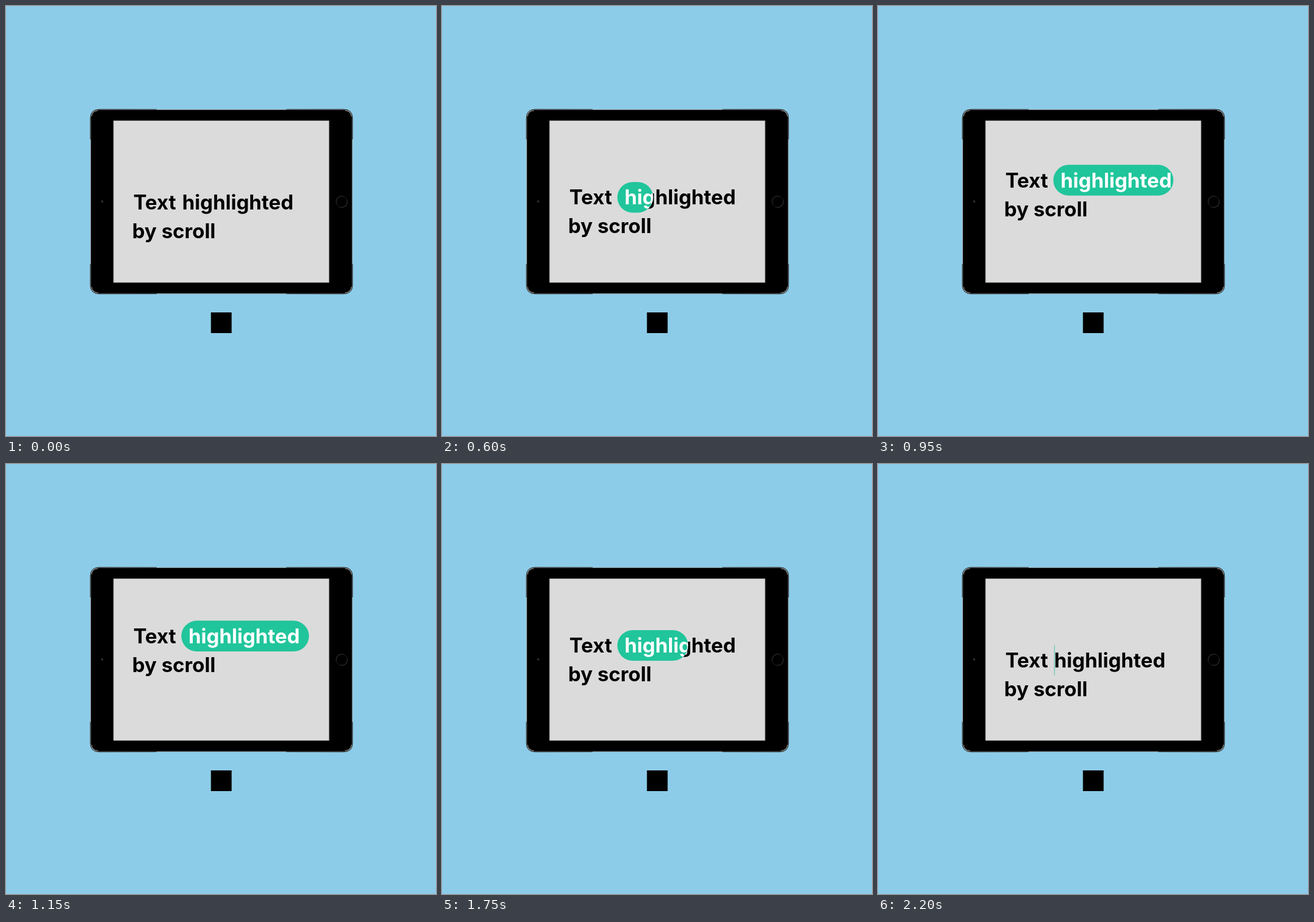
Recreate the animation shown at these times as an HTML page. Size 748 by 748 pixels, loop 2250 ms.

```html
<!DOCTYPE html>
<html lang="en">
<head>
<meta charset="utf-8">
<title>Text highlighted by scroll</title>
<style>
html, body { margin: 0; width: 100%; height: 100%; overflow: hidden; background: #8dcce8; }
svg { display: block; width: 100vw; height: 100vh; }
text { font: 700 35px Inter, "Liberation Sans", sans-serif; font-optical-sizing: none; }
</style>
</head>
<body>
<svg viewBox="0 0 748 748">
  <defs>
    <linearGradient id="ring" x1="0" x2="1" y1="0" y2="1">
      <stop offset="0" stop-color="#5a5a5a"/>
      <stop offset=".5" stop-color="#161616"/>
      <stop offset="1" stop-color="#5a5a5a"/>
    </linearGradient>
    <clipPath id="clip"><rect class="pill" y="314.6" height="53.4"/></clipPath>
    <g id="corner" fill="none">
      <path d="M146.8 232V195Q146.8 180 162 179.8L262 180" stroke="#1c1c1c"/>
      <path d="M149 192Q149.5 182.5 160 182" stroke="#b5aea8" stroke-width=".8"/>
    </g>
  </defs>

  <rect width="748" height="748" fill="#8dcce8"/>

  <!-- tablet -->
  <rect x="147.4" y="180.4" width="454.8" height="319.8" rx="14" fill="#000" stroke="#8f8b88" stroke-width=".9"/>
  <use href="#corner"/>
  <use href="#corner" transform="matrix(-1 0 0 1 749.6 0)"/>
  <use href="#corner" transform="matrix(1 0 0 -1 0 680.6)"/>
  <use href="#corner" transform="matrix(-1 0 0 -1 749.6 680.6)"/>
  <circle cx="167.3" cy="340" r="1.8" fill="#3a3a3a"/>
  <circle cx="584" cy="340.5" r="9.8" fill="#000" stroke="url(#ring)"/>
  <rect x="186.5" y="199" width="376" height="282.5" fill="#6a6a6a"/>
  <rect x="187.3" y="199.8" width="374.4" height="281" fill="#dbdbdb"/>

  <g id="copy">
    <text x="221.4" y="353.8">Text</text>
    <text x="219.6" y="403.8">by scroll</text>
    <text class="word" y="353.8">highlighted</text>
    <rect id="mark" class="pill" y="314.6" height="53.4" fill="#20c59b"/>
    <g clip-path="url(#clip)">
      <text class="word" y="353.8" fill="#fff" aria-hidden="true">highlighted</text>
    </g>
  </g>

  <rect x="356.5" y="533" width="36" height="36" fill="#000"/>
</svg>
<script>
const LOOP = 2250, STEP = 50;
const RISE = 42, FULL = 222;
const copy = document.getElementById('copy');
const mark = document.getElementById('mark');
const pills = document.querySelectorAll('.pill');
const words = document.querySelectorAll('.word');

// smooth 0..1 ramp between two times
function ramp(t, from, to) {
  const p = Math.min(1, Math.max(0, (t - from) / (to - from)));
  return p * p * p * (10 - 15 * p + 6 * p * p);
}

function draw(t) {
  const lift = RISE * (ramp(t, 338, 1138) - ramp(t, 1398, 2198));
  const grow = FULL * (ramp(t, 285, 1118) - ramp(t, 1324, 2229));
  const on = t >= 350;
  const w = on ? Math.max(0.8, grow) : 0;
  const pad = w > 1 ? Math.min(1, w / 25) : 0;

  copy.setAttribute('transform', `translate(0 ${-lift})`);
  mark.style.display = on ? '' : 'none';
  for (const p of pills) {
    p.setAttribute('x', 306.6 - 1.6 * pad);
    p.setAttribute('width', w);
    p.setAttribute('rx', Math.min(w / 2, 26.7));
    p.setAttribute('ry', Math.min(w / 2, 26.7));
  }
  for (const el of words) el.setAttribute('x', 306.5 + 11 * pad);
}

const start = performance.now();
function tick() {
  const t = (performance.now() - start) % LOOP;
  draw(Math.floor(t / STEP) * STEP);
  requestAnimationFrame(tick);
}
draw(0);
requestAnimationFrame(tick);
</script>
</body>
</html>
```
